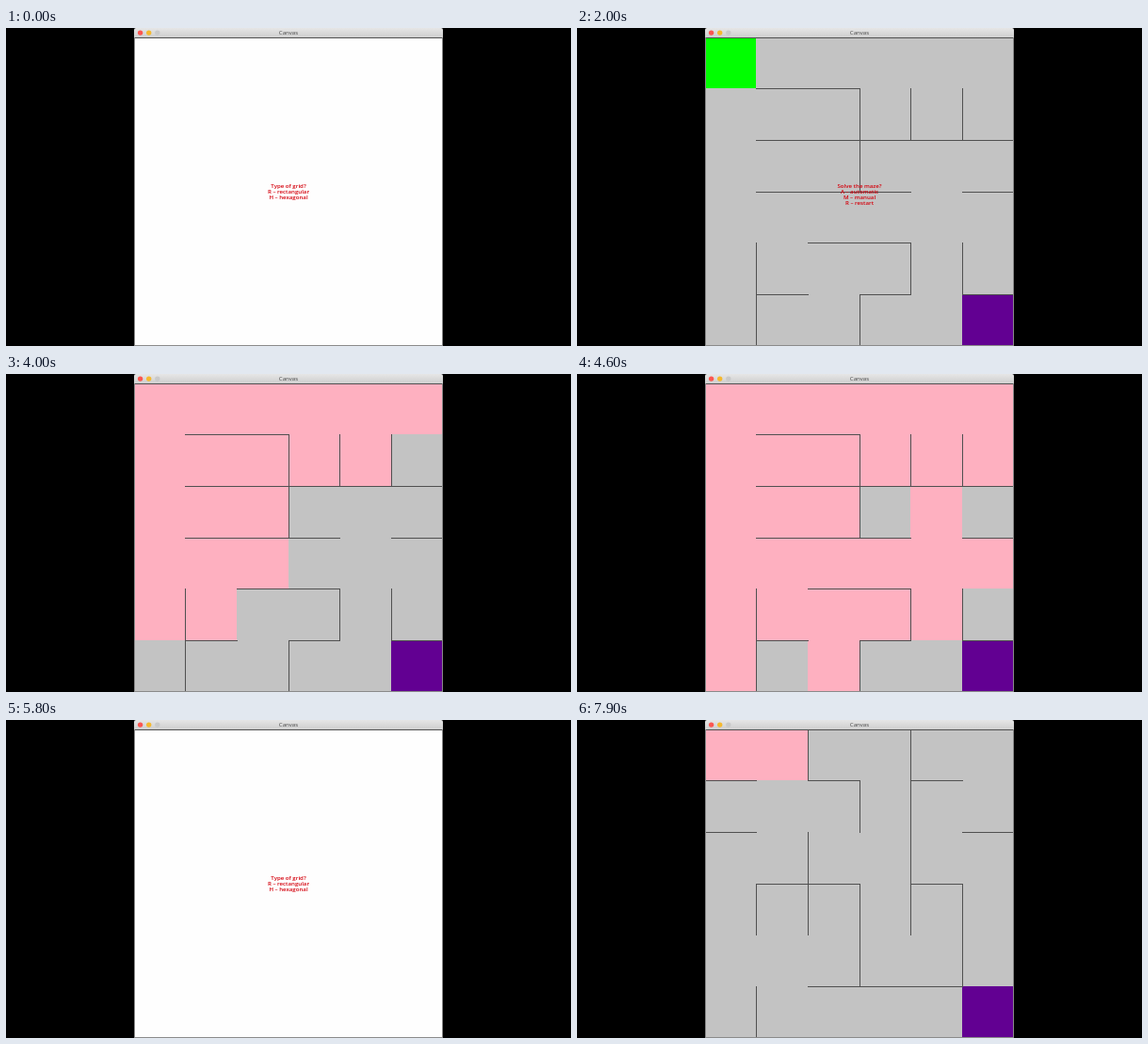
An HTML page with a canvas that plays this animation: 600 px wide and 338 px high, repeating every 8000 ms.

```html
<!DOCTYPE html>
<html lang="en">
<head>
<meta charset="utf-8">
<title>Maze</title>
<style>
  html, body { margin: 0; width: 100%; height: 100%; overflow: hidden; background: #000; }
  canvas { display: block; }
</style>
</head>
<body>
<canvas id="stage" width="600" height="338"></canvas>
<script>
const ctx = document.getElementById('stage').getContext('2d');
const LOOP = 8000, TICK = 100, SIZE = 6;
const LEFT = 136, RIGHT = 464, TOP = 10, BOTTOM = 338;
const COLORS = {
  floor: '#c3c3c3', wall: '#505050', start: '#00ff00', goal: '#620092',
  visited: '#feb0c0', path: '#ff4cab', text: '#d4000c'
};
const PROMPTS = {
  grid: ['Type of grid?', 'R – rectangular', 'H – hexagonal'],
  solve: ['Solve the maze?', 'A – automatic', 'M – manual', 'R – restart'],
  search: ['Type of search?', 'B – breadth-first', 'D – depth-first']
};

const gridX = i => Math.floor(136.4 + i * 54.55);
const gridY = i => Math.floor(10.2 + i * 54.6);
const hash = n => { const s = Math.sin(n * 127.1) * 43758.5453; return s - Math.floor(s); };
const clamp = (v, lo, hi) => Math.min(hi, Math.max(lo, v));

// rows[i]: columns walled below row i; cols[i]: rows walled right of column i.
function makeMaze(rows, cols, seed) {
  const edges = [];
  for (let line = 0; line < SIZE - 1; line++) {
    for (let k = 0; k < SIZE; k++) {
      edges.push({ x: k, y: line, vertical: false, wall: rows[line].includes(k) });
      edges.push({ x: line, y: k, vertical: true, wall: cols[line].includes(k) });
    }
  }
  // The lower right corner is carved last.
  edges.forEach((e, i) => { e.order = hash(i + seed) + (e.x > 2 && e.y > 0 ? 0.25 : 0); });
  const openings = edges.filter(e => !e.wall).sort((a, b) => a.order - b.order);
  return { edges, openings, ...solve(openings) };
}

function solve(openings) {
  const isOpen = (x, y, vertical) =>
    openings.some(e => e.x === x && e.y === y && e.vertical === vertical);
  const visited = [{ x: 0, y: 0, from: null }];
  for (let i = 0; i < visited.length; i++) {
    const cell = visited[i], { x, y } = cell;
    const visit = (nx, ny, open) => {
      if (open && !visited.some(c => c.x === nx && c.y === ny)) {
        visited.push({ x: nx, y: ny, from: cell });
      }
    };
    visit(x - 1, y, isOpen(x - 1, y, true));
    visit(x + 1, y, isOpen(x, y, true));
    visit(x, y - 1, isOpen(x, y - 1, false));
    visit(x, y + 1, isOpen(x, y, false));
  }
  const path = [];
  let cell = visited.find(c => c.x === SIZE - 1 && c.y === SIZE - 1);
  for (; cell; cell = cell.from) path.push(cell);
  return { visited, path };
}

const runs = [
  {
    begin: 0, grid: 200, carve: 500, carved: 1850, solve: 2000, search: 2300,
    clear: 2700, explore: 2900, trace: 5050,
    maze: makeMaze(['12', '12345', '1235', '23', '135'], ['45', '', '125', '14', '14'], 3)
  },
  {
    begin: 5800, grid: 6000, carve: 6500, carved: 7400, solve: 7400, search: 7500,
    clear: 7700, explore: 7840, trace: Infinity,
    maze: makeMaze(['024', '05', '124', '', '234'], ['35', '023', '134', '0123', '34'], 8)
  }
];

function drawWindow() {
  ctx.fillStyle = '#000';
  ctx.fillRect(0, 0, 600, 338);
  const bar = ctx.createLinearGradient(0, 0, 0, TOP);
  bar.addColorStop(0, '#e6e6e6');
  bar.addColorStop(1, '#cecece');
  ctx.fillStyle = bar;
  ctx.beginPath();
  ctx.roundRect(LEFT, 0, RIGHT - LEFT, TOP + 1, [2, 2, 0, 0]);
  ctx.fill();
  ['#fc5650', '#f5b92e', '#c9c9c9'].forEach((color, i) => {
    ctx.fillStyle = color;
    ctx.beginPath();
    ctx.arc(142.6 + i * 9.1, 5.1, 2.7, 0, 7);
    ctx.fill();
  });
  ctx.textAlign = 'center';
  ctx.fillStyle = '#444';
  ctx.font = '6.1px "Open Sans", sans-serif';
  ctx.fillText('Canvas', 300, 7.3);
  ctx.fillStyle = '#fefefe';
  ctx.fillRect(LEFT, TOP, RIGHT - LEFT, BOTTOM - TOP);
}

function drawFrame() {
  ctx.fillStyle = COLORS.wall;
  ctx.fillRect(LEFT, TOP, RIGHT - LEFT, 1);
  ctx.fillStyle = '#8a8a8a';
  ctx.fillRect(LEFT, TOP, 1, BOTTOM - TOP);
  ctx.fillRect(RIGHT - 1, TOP, 1, BOTTOM - TOP);
  ctx.fillRect(LEFT, BOTTOM - 1, RIGHT - LEFT, 1);
}

function fillCell({ x, y }, color) {
  ctx.fillStyle = color;
  ctx.fillRect(gridX(x), gridY(y), gridX(x + 1) - gridX(x), gridY(y + 1) - gridY(y));
}

function drawWall({ x, y, vertical }) {
  ctx.fillStyle = COLORS.wall;
  if (vertical) ctx.fillRect(gridX(x + 1), gridY(y), 1, gridY(y + 1) - gridY(y) + 1);
  else ctx.fillRect(gridX(x), gridY(y + 1), gridX(x + 1) - gridX(x) + 1, 1);
}

function drawMaze(run, t) {
  const { edges, openings, visited, path } = run.maze;
  ctx.fillStyle = COLORS.floor;
  ctx.fillRect(LEFT, TOP, RIGHT - LEFT, BOTTOM - TOP);
  fillCell({ x: 0, y: 0 }, COLORS.start);
  fillCell({ x: SIZE - 1, y: SIZE - 1 }, COLORS.goal);

  const explored = Math.max(0, 1 + Math.floor((t - run.explore) / 60));
  const traced = Math.max(0, Math.floor((t - run.trace) / 50));
  visited.slice(0, explored).forEach(cell => fillCell(cell, COLORS.visited));
  path.slice(0, traced).forEach(cell => fillCell(cell, COLORS.path));

  const progress = clamp((t + TICK / 2 - run.carve) / (run.carved - run.carve), 0, 1);
  const carved = Math.ceil(openings.length * (1 - (1 - progress) ** 1.4));
  edges.filter(e => e.wall).concat(openings.slice(carved)).forEach(drawWall);
}

function drawPrompt(lines) {
  ctx.fillStyle = COLORS.text;
  ctx.font = '600 6.1px "Open Sans", sans-serif';
  lines.forEach((line, i) => ctx.fillText(line, 300, 170.2 + i * 6));
}

function render(now) {
  const t = Math.floor((now % LOOP) / TICK) * TICK;
  const run = t < runs[1].begin ? runs[0] : runs[1];
  drawWindow();
  if (t >= run.grid) drawMaze(run, t);
  drawFrame();
  if (t < run.grid) drawPrompt(PROMPTS.grid);
  else if (t >= run.solve && t < run.search) drawPrompt(PROMPTS.solve);
  else if (t >= run.search && t < run.clear) drawPrompt(PROMPTS.search);
}

const origin = performance.now();
function loop() {
  render(performance.now() - origin);
  requestAnimationFrame(loop);
}
loop();
</script>
</body>
</html>
```
